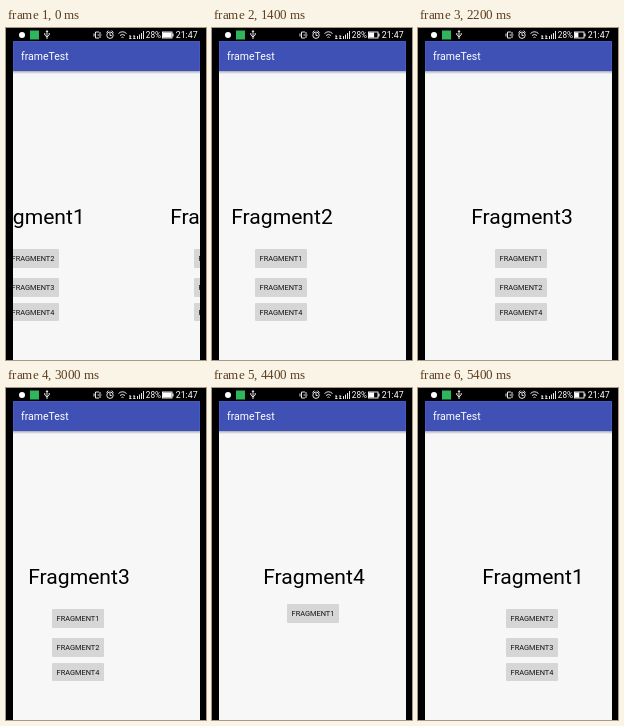
An HTML page for the animation above (5.6 s loop, 200x332 px).

```html
<!DOCTYPE html>
<html lang="en">
<head>
<meta charset="utf-8">
<title>frameTest</title>
<style>
  html, body { margin: 0; width: 100%; height: 100%; overflow: hidden; background: #000; }
  svg { display: block; }
  text { font-family: Roboto, Arial, sans-serif; }
  .heading { font-size: 21.1px; text-anchor: middle; }
  .label { font-size: 7.4px; text-anchor: middle; fill: #111; }
  .line { fill: none; stroke: #fff; stroke-width: .9; }
  .status { fill: #fff; }
</style>
</head>
<body>
<svg width="200" height="332" viewBox="0 0 200 332">
  <defs>
    <linearGradient id="shade" x2="0" y2="1">
      <stop stop-color="#a9acba"/>
      <stop offset="1" stop-color="#f7f7f7"/>
    </linearGradient>
  </defs>
  <rect width="200" height="332"/>

  <!-- status bar -->
  <circle class="status" cx="16" cy="7" r="3"/>
  <rect x="24" y="2.500" width="9" height="9" fill="#2fb65a"/>
  <path class="line" d="M41 11V3M38.800 5v2l2.200 2 2.200-2V5M40 4l1-1.500L42 4"/>
  <path class="line" d="M93 4h-3.500v6H93M91.500 7h4M94 4v2M94 8v2M88 5.500v3"/>
  <circle class="line" cx="104" cy="7.200" r="3.200"/>
  <path class="line" d="M104 5v2.500h1.700M100.500 4.500l2-1.800M107.500 4.500l-2-1.800"/>
  <path class="line" d="M112.500 5.500q4-3.500 8 0M114 7.500q2.500-2.200 5 0M115.500 9.500q1-1 2 0"/>
  <path class="line" d="M123 8h2l-1.500 2.500h2M127 8h2l-1.500 2.500h2M131.500 11V8M133.500 11V6.500M135.500 11V5M137.500 11V3"/>
  <text class="status" x="139.800" y="10.200" font-size="8.200">28%</text>
  <rect class="line" x="156.500" y="4" width="9.500" height="6"/>
  <rect class="status" x="166.300" y="5.500" width="1.200" height="3"/>
  <rect class="status" id="charge" x="157" y="4.500" height="5"/>
  <text class="status" x="169.700" y="10.200" font-size="8.800">21:47</text>

  <!-- sliding pages, clipped to the screen -->
  <svg x="7" y="13" width="187" height="319" viewBox="7 13 187 319">
    <rect x="7" y="13" width="187" height="319" fill="#f7f7f7"/>
    <g id="pages"></g>
    <rect x="7" y="43" width="187" height="3" fill="url(#shade)"/>
    <rect x="7" y="13" width="187" height="30" fill="#3f51b5"/>
    <path d="M7.500 43V13.500H193.500V43" fill="none" stroke="#455ac4"/>
    <text x="15" y="32" font-size="10.500" fill="#fff">frameTest</text>
  </svg>
</svg>
<script>
const LOOP = 5600, STEP = 200, WIDTH = 187, CENTER = 101;
const slides = [
  { from: 0, to: 1, start: -521, length: 1210 },
  { from: 1, to: 2, start: 1072, length: 1210 },
  { from: 2, to: 3, start: 2615, length: 1510 },
  { from: 3, to: 0, start: 4451, length: 1147 }
];
// [time, fill] of the charging indicator
const charges = [[0, 1], [600, .35], [1200, .6], [2000, .4], [2800, 1], [3600, .6], [4600, .5]];
const charge = document.getElementById('charge');
const holder = document.getElementById('pages');

const button = (n, y, h) => `
  <rect x="${CENTER - 26}" y="${y}" width="52" height="${h}" rx="1" fill="#d6d6d6"/>
  <text class="label" x="${CENTER}" y="${y + h / 2 + 2.6}">FRAGMENT${n}</text>`;

const page = n => {
  const targets = n === 4 ? [1] : [1, 2, 3, 4].filter(k => k !== n);
  const tops = n === 4 ? [216] : [221, 250, 275];
  return `<g><text class="heading" x="${CENTER + 1}" y="196">Fragment${n}</text>` +
    targets.map((k, i) => button(k, tops[i], i === 2 ? 18 : 19)).join('') + '</g>';
};
holder.innerHTML = [1, 2, 3, 4].map(page).join('');
const pages = [...holder.children];

const ease = u => (1 - Math.cos(Math.PI * u)) / 2;

function place(n, x) {
  pages[n].setAttribute('transform', `translate(${x} 0)`);
  pages[n].style.display = Math.abs(x) < WIDTH ? '' : 'none';
}

function draw(now) {
  const t = Math.floor(now % LOOP / STEP) * STEP;
  const slide = slides.findLast(s => s.start <= t);
  const shift = Math.ceil(WIDTH * ease(Math.min(1, (t - slide.start) / slide.length)));
  pages.forEach((_, n) => place(n, WIDTH));
  place(slide.from, -shift);
  place(slide.to, WIDTH - shift);
  charge.setAttribute('width', 8.5 * charges.findLast(c => c[0] <= t)[1]);
}

const origin = performance.now();
function tick() {
  draw(performance.now() - origin);
  requestAnimationFrame(tick);
}
tick();
</script>
</body>
</html>
```
